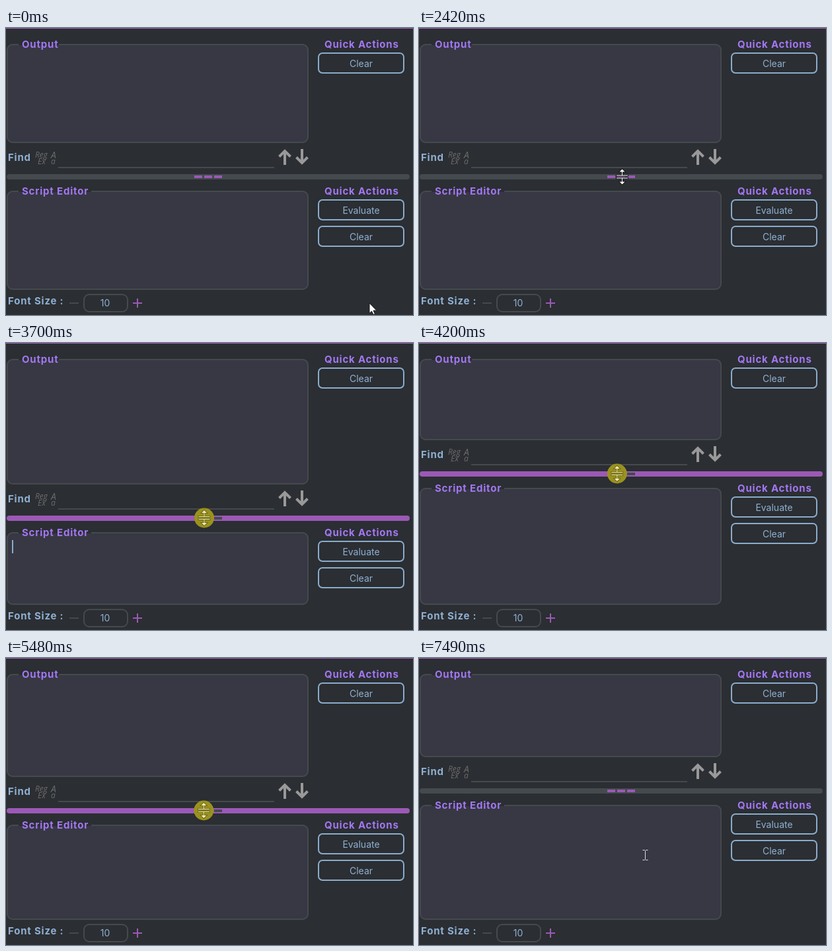
An HTML page that plays this animation: 616 by 434 pixels, repeating every 7.99 s.

```html
<!DOCTYPE html>
<html lang="en">
<head>
<meta charset="utf-8">
<title>Split panes</title>
<style>
html, body { margin: 0; width: 100%; height: 100%; overflow: hidden; background: #2b2e32; }
svg { display: block; }
text { font: 14px Inter, sans-serif; fill: #8fb0d3; }
.label { font-weight: 700; font-size: 15px; letter-spacing: .8px; }
.title { fill: #a277f2; }
.mid { text-anchor: middle; }
.hint { font: italic 12px "Open Sans", sans-serif; fill: #6b6b6b; }
.panel { fill: #373844; stroke: #454a4d; stroke-width: 2; }
.gap { fill: #2b2e32; }
.line { fill: none; stroke: #454a4d; stroke-width: 2; }
.button { fill: none; stroke: #8aaccc; stroke-width: 2; }
.arrows { fill: none; stroke: #999; stroke-width: 4; }
.accent { fill: none; stroke: #9b59b6; stroke-width: 2; }
.bar { fill: #444a4e; }
.dash { fill: #9b59b6; }
.pressed .bar { fill: #9b59b6; }
.pressed .dash { fill: #444a4e; }
#halo { fill: #9a921f; display: none; }
.pressed #halo { display: inline; }
#arrow { fill: #fff; stroke: #17181a; }
#ibeam { fill: none; stroke: #ddd; }
#resize { fill: #fff; stroke: #17181a; stroke-width: 2; paint-order: stroke; }
.pressed #resize { fill: #f2edac; stroke: #6d681b; }
</style>
</head>
<body>
<svg id="stage" width="616" height="434" viewBox="0 0 616 434">
  <defs>
    <g id="actions">
      <text class="label title" x="482" y="30">Quick Actions</text>
      <rect class="button" x="473" y="38" width="129" height="30" rx="6"/>
    </g>
  </defs>
  <path class="accent" d="M0 0H616"/>

  <rect class="panel" id="output" x="2" y="25" width="455" rx="8"/>
  <rect class="gap" x="19" y="23" width="61" height="3"/>
  <text class="label title" x="24" y="30">Output</text>
  <use href="#actions"/>
  <text class="mid" x="537.5" y="59">Clear</text>

  <g id="split">
    <text class="label" x="3" y="201">Find</text>
    <text class="hint" x="44" y="196">Reg</text>
    <text class="hint" x="48" y="206">Ex</text>
    <text class="hint" x="68" y="197" style="font-size:14px">A</text>
    <text class="hint" x="68" y="206">a</text>
    <path class="line" d="M79 211H406"/>
    <path class="arrows" d="M422 207V186M413.5 194.5L422 186L430.5 194.5M448 183V204M439.5 195.5L448 204L456.5 195.5"/>

    <rect class="bar" x="1" y="221" width="610" height="8" rx="4"/>
    <path class="dash" d="M285 223h12v4h-12zm15 0h12v4h-12zm15 0h12v4h-12z"/>

    <rect class="panel" id="editor" x="2" y="247" width="455" rx="8"/>
    <rect class="gap" x="19" y="245" width="110" height="3"/>
    <text class="label title" x="24" y="252">Script Editor</text>
    <rect id="caret" x="9" y="258" width="2" height="20" fill="#8aaccc"/>
    <use href="#actions" y="222"/>
    <text class="mid" x="537.5" y="281">Evaluate</text>
    <rect class="button" x="473" y="300" width="129" height="30" rx="6"/>
    <text class="mid" x="537.5" y="321">Clear</text>
  </g>

  <text class="label" x="3" y="418">Font Size :</text>
  <path class="line" d="M96 416H110"/>
  <rect class="line" x="118" y="403" width="66" height="26" rx="8"/>
  <text class="mid" x="150" y="421">10</text>
  <path class="accent" d="M192 416H206M199 409V423"/>

  <g id="pointer">
    <circle id="halo" r="15"/>
    <path id="arrow" d="M0 0V15.5L3.5 12.2L6 17.5L8.4 16.4L6 11.2H10.8Z"/>
    <path id="ibeam" d="M-4 -7.5H-1L0 -6.5L1 -7.5H4M0 -6.5V6.5M-4 7.5H-1L0 6.5L1 7.5H4"/>
    <path id="resize" d="M0 -11.5L4 -7.5H.5V-2.5H8.5V-1.5H-8.5V-2.5H-.5V-7.5H-4ZM0 11.5L4 7.5H.5V2.5H8.5V1.5H-8.5V2.5H-.5V7.5H-4Z"/>
  </g>
</svg>
<script>
const LOOP = 7990, STEP = 127, PRESS = 21, RELEASE = 50, BLINK = 632;
const $ = id => document.getElementById(id);

const linear = f => f;
const easeOut = f => 1 - (1 - f) ** 2;
const easeInOut = f => f * f * (3 - 2 * f);

// Keys: at = step, to = values reached there, ease = way to get there
const key = (at, to, ease = linear) => ({ at, to, ease });

const dragKeys = [
  key(PRESS, [0]), key(26, [45], easeOut), key(28, [45]), key(29, [40]), key(33, [-27]),
  key(37, [-45], easeOut), key(43, [6], easeInOut), key(45, [7]), key(48, [-24])
];
const pointerKeys = [
  key(0, [550, 416]), key(2, [531, 410]), key(4, [531, 410]),
  key(11, [375.5, 272], easeInOut), key(15, [309.5, 229], easeOut),
  key(19, [307.5, 225]), key(PRESS, [307.5, 225]), key(29, [300, 225]),
  key(49, [299, 201]), key(54, [342.5, 298], easeOut)
];

function tween(keys, step) {
  const i = keys.findIndex(k => k.at > step);
  if (i < 0) return keys[keys.length - 1].to;
  if (i === 0) return keys[0].to;
  const a = keys[i - 1], b = keys[i];
  const f = b.ease((step - a.at) / (b.at - a.at));
  return a.to.map((v, n) => v + (b.to[n] - v) * f);
}

const show = (id, on) => $(id).setAttribute("visibility", on ? "visible" : "hidden");

function draw(now) {
  const step = Math.floor(now % LOOP / STEP + .1);
  const offset = Math.round(tween(dragKeys, step)[0]);
  const pressed = step >= PRESS && step < RELEASE;
  let [x, y] = tween(pointerKeys, step);
  if (pressed) y = 224.5 + offset;

  $("output").setAttribute("height", 148 + offset);
  $("editor").setAttribute("height", 148 - offset);
  $("split").setAttribute("transform", `translate(0 ${offset})`);
  $("pointer").setAttribute("transform", `translate(${x} ${y})`);
  $("stage").classList.toggle("pressed", pressed);

  const resize = Math.abs(y - 225 - offset) < 6;
  const ibeam = !resize && x < 458 && y >= 246 + offset && y < 396;
  show("resize", resize);
  show("ibeam", ibeam);
  show("arrow", !resize && !ibeam);
  show("caret", step >= 24 && Math.ceil((7490 - step * STEP) / BLINK) % 2 === 1);
}

function tick() {
  draw(performance.now());
  requestAnimationFrame(tick);
}
tick();
</script>
</body>
</html>
```
